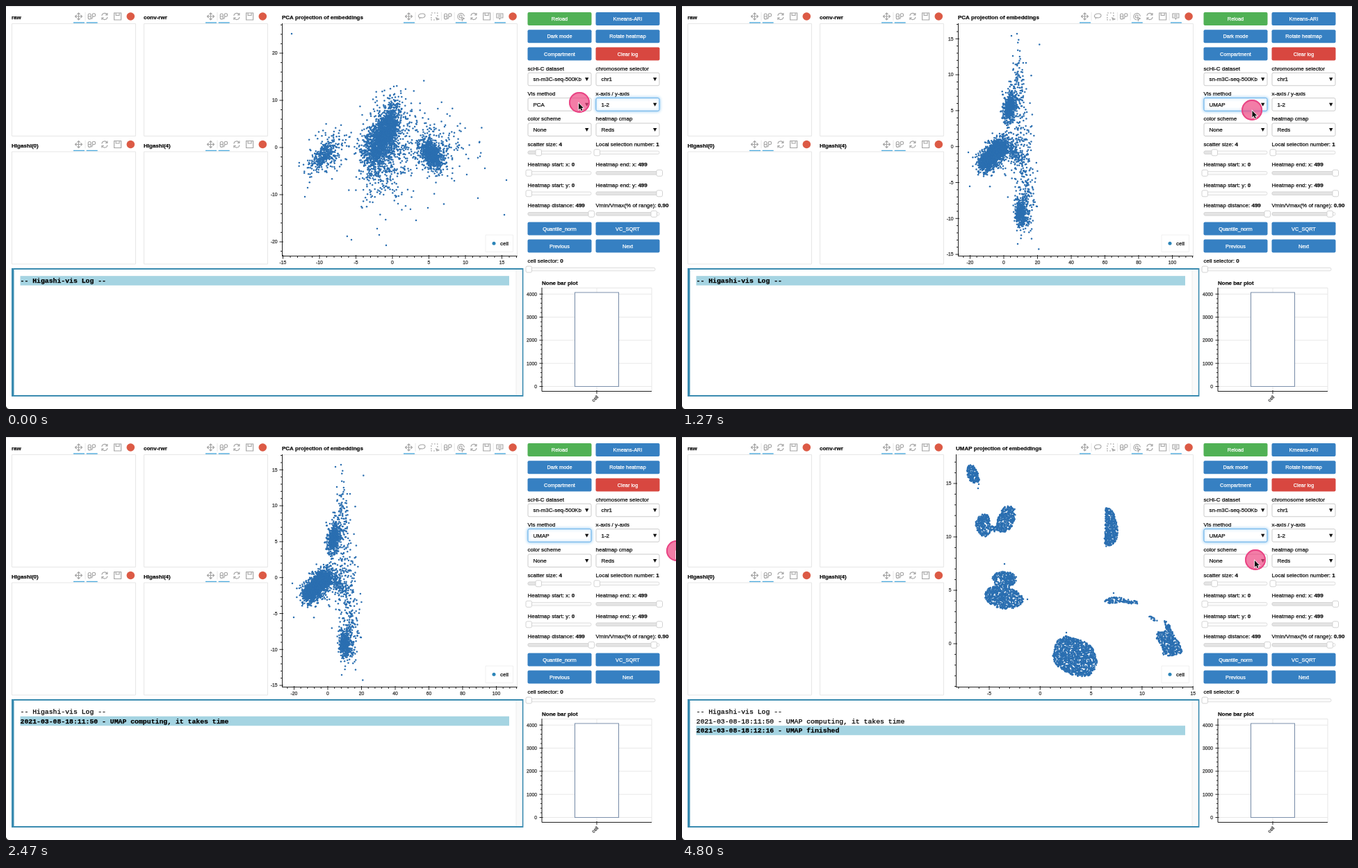
Animation, 964 px wide and 581 px high, one loop 4.87 s. Source, as an HTML page with a canvas:

```html
<!DOCTYPE html>
<html lang="en">
<head>
<meta charset="utf-8">
<title>Embedding viewer</title>
<style>
html, body { margin: 0; height: 100%; overflow: hidden; background: #fff; }
canvas { display: block; }
</style>
</head>
<body>
<canvas id="stage" width="964" height="581"></canvas>
<script>
const W = 964, H = 581, LOOP = 4870;
const SANS = '"Liberation Sans", Arial, sans-serif';
const MONO = '"Liberation Mono", monospace';
const BLUE = '#3680c2', DOT = '#2b6fb1';
const stage = document.getElementById('stage').getContext('2d');
let c = stage;

let seed = 7;
function random() {
  seed = seed + 0x6D2B79F5 | 0;
  let r = Math.imul(seed ^ seed >>> 15, 1 | seed);
  r = r + Math.imul(r ^ r >>> 7, 61 | r) ^ r;
  return ((r ^ r >>> 14) >>> 0) / 4294967296;
}

function layer(draw) {
  const canvas = document.createElement('canvas');
  canvas.width = W;
  canvas.height = H;
  c = canvas.getContext('2d');
  draw();
  c = stage;
  return canvas;
}

// A hairline stroke gives small text the heavier look of screen smoothing.
function text(s, x, y, { size = 8, weight = '', color = '#111', align = 'left', family = SANS } = {}) {
  c.font = `${weight} ${size}px ${family}`;
  c.fillStyle = c.strokeStyle = color;
  c.lineWidth = .25;
  c.textAlign = align;
  c.textBaseline = 'alphabetic';
  c.fillText(s, x, y + size * 0.35);
  c.strokeText(s, x, y + size * 0.35);
  return c.measureText(s).width;
}

function line(x1, y1, x2, y2, color = '#222', width = 1) {
  c.strokeStyle = color;
  c.lineWidth = width;
  c.beginPath();
  c.moveTo(x1, y1);
  c.lineTo(x2, y2);
  c.stroke();
}

function box(x, y, w, h, fill, stroke, radius = 0, width = 1) {
  c.beginPath();
  c.roundRect(x, y, w, h, radius);
  if (fill) { c.fillStyle = fill; c.fill(); }
  if (stroke) { c.strokeStyle = stroke; c.lineWidth = width; c.stroke(); }
}

function disc(x, y, r, color) {
  c.fillStyle = color;
  c.beginPath();
  c.arc(x, y, r, 0, 7);
  c.fill();
}

// Toolbars

const ICONS = {
  pan: 'M-5 0H5M0-5V5M-3-2L-5 0L-3 2M3-2L5 0L3 2M-2-3L0-5L2-3M-2 3L0 5L2 3',
  wheel: 'M-5-2a2 2 0 0 1 4 0v4a2 2 0 0 1-4 0zM-5 0h4M1-2a2.2 2.2 0 1 1 4.4 0a2.2 2.2 0 1 1-4.4 0M1.8 0L0 4',
  reset: 'M-4-1A4 4 0 0 1 3.5-2.5M4-5v3h-3M4 1A4 4 0 0 1-3.5 2.5M-4 5v-3h3',
  save: 'M-5-5H5V5H-5ZM-2.5-5V-1.5H2.5V-5',
  lasso: 'M-2 2C-7 1-5-4 1-4C6-4 6 1 1 2C-2 2-4 1-3 4',
  select: 'M-5-5h2M-1-5h2M3-5h1v1M-5-3v2M-5 1v2M-5 4v1h1M-2 5h2M4-2v2M2 2l4 2l-3 1z',
  tap: 'M5 0A4.7 4.7 0 1 0 0 5M2 0A2 2 0 1 0 0 2M1 1l4 2l-2 1l-1 2z',
  hover: 'M-4.5-4h9v6h-3.5l-1 2l-1-2h-3.5zM-2.5-2h5M-2.5 0h5'
};

function toolbar(x, y, names, active, separators) {
  names.forEach((name, i) => {
    const cx = x + i * 18.7;
    c.save();
    c.translate(cx, y);
    c.strokeStyle = '#a3a3a3';
    c.lineWidth = 1.1;
    c.stroke(new Path2D(ICONS[name]));
    c.restore();
    if (active.includes(i)) line(cx - 7.5, y + 9, cx + 8.5, y + 9, '#4aa8dc', 1.4);
    if (separators.includes(i)) line(cx + 9.5, y - 6, cx + 9.5, y + 6, '#e8e8e8');
  });
  disc(x + names.length * 18.7, y, 5.8, '#dc5a45');
}

function heatmapPanel(title, x, y) {
  text(title, x, y + 16.5, { weight: 'bold' });
  toolbar(x + 96.5, y + 15, ['pan', 'wheel', 'reset', 'save'], [0, 1], [0]);
  box(x + .5, y + 25.5, 178, 162, null, '#e6e6e6');
}

// Control column

const COLS = [750.5, 848.5];

function button(label, col, y, color = BLUE) {
  box(COLS[col], y - 9.5, 92, 19, color, null, 2);
  text(label, COLS[col] + 46, y, { size: 7.4, color: '#fff', align: 'center' });
}

function select(value, col, y, focused) {
  const x = COLS[col];
  c.save();
  if (focused) { c.shadowColor = 'rgba(90,175,235,.8)'; c.shadowBlur = 4; }
  box(x + .5, y - 9, 91, 18.5, '#fff', focused ? '#66afe9' : '#cbcbcb', 2);
  c.restore();
  text(value, x + 8, y);
  c.fillStyle = '#111';
  c.fill(new Path2D(`M${x + 82.5} ${y - 2}h5.4l-2.7 5z`));
}

function slider(label, value, x, y, handle, width = 91) {
  const w = text(label + ': ', x - .5, y);
  text(value, x - .5 + w, y, { weight: 'bold' });
  box(x, y + 10, width, 4.5, '#fafafa', '#d8d8d8', 2, .8);
  box(x, y + 10, handle - x, 4.5, '#e4e4e4', '#d3d3d3', 2, .8);
  box(handle - 4, y + 7.8, 8.5, 9, '#fff', '#cfcfcf', 2, .9);
}

function barPlot() {
  text('None bar plot', 771, 399, { weight: 'bold' });
  box(771.5, 406.5, 157.5, 149, null, '#e6e6e6');
  line(850, 406, 850, 555, '#e8e8e8');
  for (let i = 0; i <= 20; i++) {
    const y = 548.5 - i * 6.66, major = i % 5 === 0;
    if (major) {
      line(771, y, 929, y, '#e8e8e8');
      text(i * 200, 764, y, { size: 6.75, align: 'right', color: '#333' });
    }
    line(major ? 767.5 : 769, y, major ? 772.5 : 771, y);
  }
  box(818.5, 413, 63, 135.5, '#fff', '#7c90ab', 0, 1.1);
  line(771, 406, 771, 555.5);
  line(771, 555.5, 929, 555.5);
  line(850, 554, 850, 559);
  c.save();
  c.translate(847.5, 566);
  c.rotate(-Math.PI / 4);
  text('cell', 0, 0, { size: 6.75, align: 'center', color: '#333' });
  c.restore();
}

const page = layer(() => {
  c.fillStyle = '#fff';
  c.fillRect(0, 0, W, H);
  line(0, .5, W, .5, '#e2e2e2');
  c.fillStyle = '#222';
  c.fill(new Path2D('M0 577Q1 580 4 581H0Z'));

  heatmapPanel('raw', 8, 0);
  heatmapPanel('conv-rwr', 198, 0);
  heatmapPanel('Higashi(0)', 8, 184.5);
  heatmapPanel('Higashi(4)', 198, 184.5);
  toolbar(579.5, 15, ['pan', 'lasso', 'select', 'wheel', 'tap', 'reset', 'save', 'hover'], [0, 4, 7], [0, 2, 3, 6]);

  button('Reload', 0, 18.5, '#50b155');
  button('Kmeans-ARI', 1, 18.5);
  button('Dark mode', 0, 43.7);
  button('Rotate heatmap', 1, 43.7);
  button('Compartment', 0, 69);
  button('Clear log', 1, 69, '#d84740');
  button('Quantile_norm', 0, 321);
  button('VC_SQRT', 1, 321);
  button('Previous', 0, 346);
  button('Next', 1, 346);

  [['scHi-C dataset', 'chromosome selector'], ['Vis method', 'x-axis / y-axis'], ['color scheme', 'heatmap cmap']]
    .forEach((row, i) => row.forEach((label, col) => text(label, COLS[col], 90 + i * 36.3)));
  select('sn-m3C-seq-500Kb', 0, 105.3);
  select('chr1', 1, 105.3);
  select('None', 0, 178);
  select('Reds', 1, 178);

  slider('scatter size', '4', 751, 199, 766);
  slider('Local selection number', '1', 849, 199, 850);
  slider('Heatmap start: x', '0', 751, 228.5, 752);
  slider('Heatmap end: x', '499', 849, 228.5, 940);
  slider('Heatmap start: y', '0', 751, 258, 752);
  slider('Heatmap end: y', '499', 849, 258, 940);
  slider('Heatmap distance', '499', 751, 287.5, 842);
  slider('Vmin/Vmax(% of range)', '0.90', 849, 287.5, 932);
  slider('cell selector', '0', 751, 367.3, 752, 183);
  barPlot();

  box(9, 379, 734.5, 183, '#fff', '#3a8bb0', 0, 1.8);
  c.fillStyle = '#3a8bb0';
  c.fillRect(8, 378, 3.5, 185);
  c.fillStyle = '#fafafa';
  c.fillRect(734, 380, 8.5, 181);
  line(734, 380, 734, 561, '#ececec');
});

// Scatter plots

function gauss() {
  return Math.sqrt(-2 * Math.log(1 - random())) * Math.cos(2 * Math.PI * random());
}

const dot = (x, y) => disc(x, y, 1.25, DOT);

function cloud(n, x, y, sx, sy, degrees = 0) {
  const cos = Math.cos(degrees * Math.PI / 180), sin = Math.sin(degrees * Math.PI / 180);
  while (n--) {
    const u = gauss() * sx, v = gauss() * sy;
    dot(x + u * cos - v * sin, y + u * sin + v * cos);
  }
}

function fillShape(n, x, y, w, h, d) {
  const shape = new Path2D(d);
  while (n) {
    const px = x + random() * w, py = y + random() * h;
    if (c.isPointInPath(shape, px, py)) { dot(px, py); n--; }
  }
}

// x and y axes: [pixel of zero, pixels per major tick, value per major tick]
function scatter(title, left, xAxis, yAxis, points) {
  return layer(() => {
    text(title, left, 16.5, { weight: 'bold' });
    box(left + .5, 25.5, 735 - left, 335, null, '#e6e6e6');
    points();
    line(left + .5, 25, left + .5, 361);
    line(left, 360.5, 735.5, 360.5);
    const label = { size: 6.75, color: '#333' };
    for (let i = -40; i <= 40; i++) {
      const major = i % 5 === 0, out = major ? 4 : 2.5, inside = major ? 1.5 : 0;
      const x = xAxis[0] + i * xAxis[1] / 5, y = yAxis[0] - i * yAxis[1] / 5;
      if (x >= left && x <= 735.5) {
        line(x, 360.5 - inside, x, 360.5 + out);
        if (major) text(i / 5 * xAxis[2], x, 370, { ...label, align: 'center' });
      }
      if (y >= 25 && y <= 361) {
        line(left + .5 - out, y, left + .5 + inside, y);
        if (major) text(i / 5 * yAxis[2], left - 6.5, y, { ...label, align: 'right' });
      }
    }
    box(690, 330, 39.5, 24.5, 'rgba(255,255,255,.95)', '#f0f0f0');
    disc(702, 342.3, 2.5, '#2c85b8');
    text('cell', 711, 342.3);
  });
}

const firstPca = scatter('PCA projection of embeddings', 397, [556, 52.5, 5], [204, 68, 10], () => {
  cloud(900, 543, 188, 9, 22, 17);
  cloud(450, 533, 203, 10, 15, 15);
  cloud(380, 553, 170, 6, 17, 5);
  cloud(560, 543, 206, 18, 31, 12);
  cloud(280, 457, 217, 5, 11, 40);
  cloud(160, 461, 211, 14, 20, 40);
  cloud(700, 612, 213, 6, 10.5, -32);
  cloud(240, 616, 212, 14, 18, -20);
  cloud(90, 545, 255, 21, 22);
  cloud(150, 577, 190, 38, 30);
  cloud(50, 638, 212, 24, 28);
  [[411, 40], [717, 301], [720, 251], [689, 234], [547, 345], [537, 330], [497, 337], [430, 275],
   [434, 262], [590, 309], [607, 291], [679, 277], [534, 321], [558, 116]].forEach(p => dot(...p));
});

const secondPca = scatter('PCA projection of embeddings', 397, [463, 48.5, 20], [202.7, 51.8, 5], () => {
  cloud(550, 471, 147, 4.3, 9.5, 10);
  cloud(110, 478, 128, 6, 23, 8);
  cloud(900, 441, 222, 5.5, 8.5, 25);
  cloud(750, 456, 207, 6.5, 8, 25);
  cloud(230, 450, 212, 11, 14, 35);
  cloud(150, 477, 210, 4.5, 12, -25);
  cloud(360, 487, 300, 3.6, 9);
  cloud(150, 494, 292, 7, 18);
  cloud(100, 493, 245, 8, 28);
  cloud(140, 490, 190, 9, 38);
  cloud(30, 484, 92, 4.5, 14);
  [[474, 43], [482, 40], [414, 260], [483, 343], [511, 289], [412, 211], [476, 72]].forEach(p => dot(...p));
});

const umap = scatter('UMAP projection of embeddings', 394, [515.3, 73.3, 5], [298, 77, 5], () => {
  fillShape(190, 405, 35, 30, 40, 'M410 44Q414 38 420 41Q426 50 429 62Q424 69 418 66Q409 60 410 44Z');
  fillShape(620, 418, 95, 70, 55, 'M424 118Q432 108 440 113Q444 120 443 128L452 128Q456 108 465 100Q474 98 479 104Q482 122 470 134Q458 141 452 137L444 136Q440 146 432 143Q419 132 424 118Z');
  fillShape(470, 600, 98, 35, 64, 'M609 103Q614 100 620 108Q630 128 626 145Q622 158 610 158Q606 150 609 130Z');
  fillShape(900, 430, 190, 66, 62, 'M446 203Q450 193 464 194Q480 195 482 205Q480 214 472 214L472 218Q486 222 492 234Q486 249 464 248Q444 246 436 232Q434 219 447 216Q454 213 446 203Z');
  fillShape(110, 605, 225, 52, 20, 'M608 237Q616 228 634 232L655 237V242L630 238Q615 242 608 237Z');
  fillShape(460, 680, 262, 42, 56, 'M694 264L700 267Q706 285 715 296L720 311Q708 317 692 315Q692 300 683 291V281L697 279Z');
  fillShape(16, 670, 255, 17, 14, 'M671 257L685 264L684 267L675 263Z');
  fillShape(1250, 530, 282, 70, 66, 'M537 300Q545 283 557 288L582 296Q594 304 597 322Q598 335 585 344Q570 348 555 340Q535 330 533 318Z');
  [[427, 68], [426, 74], [464, 183], [497, 234], [490, 237], [553, 282], [621, 225]].forEach(p => dot(...p));
});

// Moving parts

const PATH = [
  [0, 825, 139], [600, 825, 139], [735, 823, 143], [867, 816, 150], [1130, 816, 150], [1330, 822, 150],
  [1467, 842, 148], [1533, 865, 148], [1600, 902, 154], [1733, 940, 160], [1933, 965, 164],
  [4200, 965, 164], [4333, 948, 165], [4467, 895, 170], [4600, 845, 175], [4733, 826, 176.5], [4800, 825, 177]
];

function pointerAt(t) {
  const next = PATH.findIndex(p => p[0] > t);
  if (next < 0) return PATH[PATH.length - 1].slice(1);
  const [a, b] = [PATH[next - 1], PATH[next]];
  const k = (t - a[0]) / (b[0] - a[0]);
  return [a[1] + (b[1] - a[1]) * k, a[2] + (b[2] - a[2]) * k];
}

function pointer(t) {
  const [x, y] = pointerAt(t);
  disc(x, y, 15, 'rgba(238,70,130,.7)');
  c.strokeStyle = '#e94585';
  c.lineWidth = 2;
  c.beginPath();
  c.arc(x, y, 14, 0, 7);
  c.stroke();

  // The arrow runs ahead of its trailing halo.
  const [ax, ay] = pointerAt(t + 45);
  c.save();
  c.translate(ax - 1, ay + 1);
  const arrow = new Path2D('M0 0V9.5L2.2 7.6L3.7 11L5.4 10.2L4 7H6.8Z');
  c.strokeStyle = '#fff';
  c.lineWidth = 1.4;
  c.stroke(arrow);
  c.fillStyle = '#111';
  c.fill(arrow);
  c.restore();
}

function menu(t) {
  const hovered = pointerAt(t)[1] > 147 ? 1 : 0;
  c.save();
  c.shadowColor = 'rgba(0,0,0,.35)';
  c.shadowBlur = 8;
  c.shadowOffsetY = 2;
  box(745, 132, 93, 74, '#e2e1e1', null, 4);
  c.restore();
  box(745, 132, 93, 74, null, '#c9c9c9', 4, .6);
  ['PCA', 'UMAP', 'TSNE', 'MDS-euclidean', 'MDS-cosine'].forEach((name, i) => {
    const y = 141.7 + i * 13.6;
    if (i === hovered) box(748.5, y - 6.8, 86, 13.4, '#3b83f6', null, 2);
    text(name, 761, y, { size: 7.8, color: i === hovered ? '#fff' : '#222', family: 'Inter, sans-serif' });
  });
  c.strokeStyle = hovered ? '#222' : '#fff';
  c.lineWidth = 1.2;
  c.stroke(new Path2D('M752 142l2 2.5l3.4-5.5'));
}

function log(t) {
  const lines = ['-- Higashi-vis Log --'];
  if (t >= 1600) lines.push('2021-03-08-18:11:50 - UMAP computing, it takes time');
  if (t >= 3930) lines.push('2021-03-08-18:12:16 - UMAP finished');
  lines.forEach((s, i) => {
    const y = 396 + i * 13.5, last = i === lines.length - 1;
    if (last) {
      c.fillStyle = '#a5d4e2';
      c.fillRect(20.5, y - 6.8, 703.5, 13.6);
    }
    text(s, 20.5, y, { size: 9.8, weight: last ? 'bold' : '', color: '#000', family: MONO });
  });
}

function render(t) {
  const opened = t >= 400, closed = t >= 1195;
  c.drawImage(page, 0, 0);
  c.drawImage(t < 595 ? firstPca : t < 3995 ? secondPca : umap, 0, 0);
  select(closed ? 'UMAP' : 'PCA', 0, 141.7, opened);
  select('1-2', 1, 141.7, !opened);
  log(t);
  if (opened && !closed) menu(t);
  pointer(t);
}

function tick() {
  const t = performance.now() % LOOP;
  render(Math.floor((t + 4) * .015) / .015);
  requestAnimationFrame(tick);
}
tick();
</script>
</body>
</html>
```
